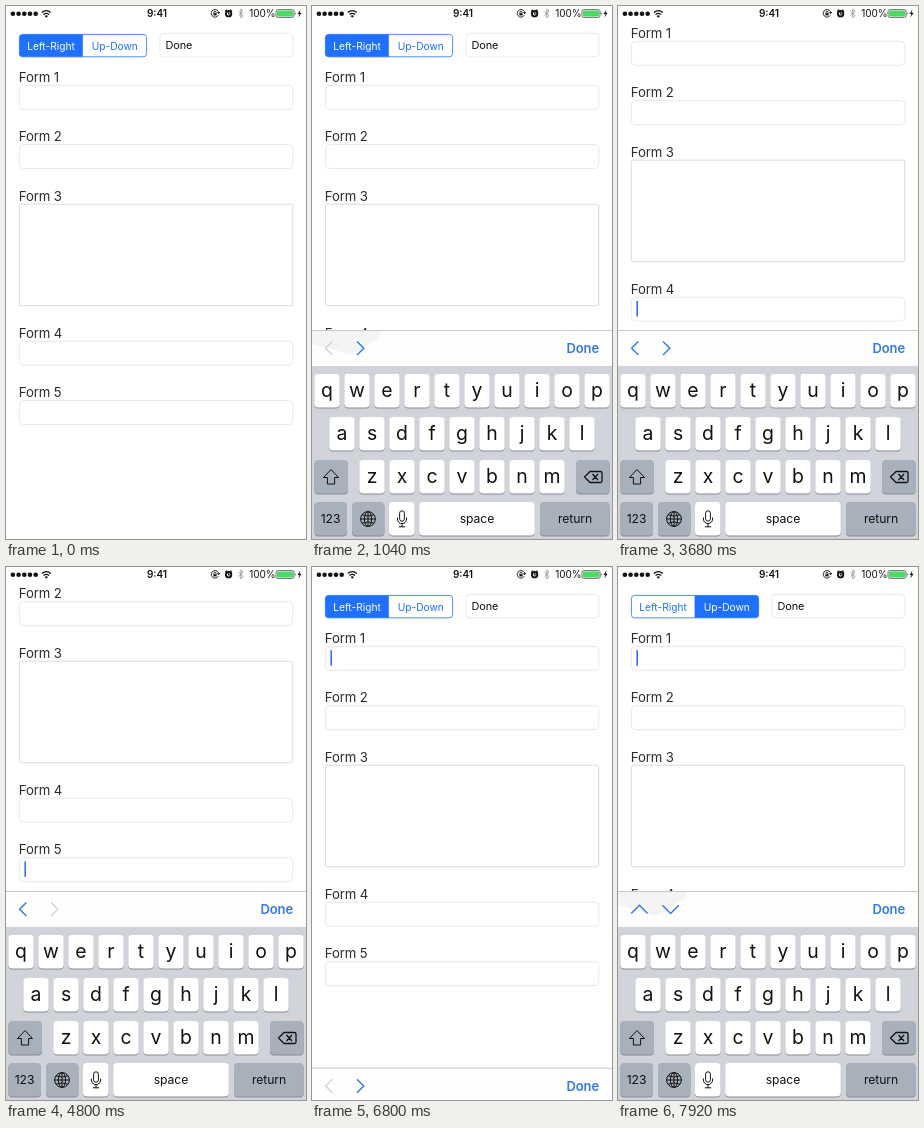
An HTML page that plays this animation: 300x533 px, repeating every 8000 ms.

```html
<!DOCTYPE html>
<html lang="en">
<head>
<meta charset="utf-8">
<title>Form navigation</title>
<style>
  html, body { margin: 0; width: 100%; height: 100%; overflow: hidden; background: #fff; }
  svg { display: block; width: 100vw; height: 100vh; font-family: Inter, Roboto, sans-serif; fill: #111; }
  .label { font-size: 13.2px; letter-spacing: -.15px; fill: #2c2c2c; }
  .field { fill: #fff; stroke: #e3e3e3; stroke-width: .8; }
  .segment { font-size: 10.2px; text-anchor: middle; }
  .small { font-size: 10.9px; letter-spacing: -.1px; }
  .status { font-size: 10px; }
  .done { font-size: 13px; font-weight: 600; letter-spacing: -.1px; text-anchor: end; fill: #3478e5; }
  .arrow { fill: none; stroke-width: 1.4; }
  .lower { font-size: 19.4px; text-anchor: middle; }
  .upper { font-size: 17.5px; text-anchor: middle; }
  .word { font-size: 12.2px; letter-spacing: -.1px; text-anchor: middle; }
  .line { fill: none; stroke: #111; stroke-linejoin: round; }
</style>
</head>
<body>
<svg viewBox="0 0 300 533" preserveAspectRatio="none">
  <rect width="300" height="533" fill="#fff"/>
  <g id="content">
    <rect x="13.4" y="28.4" width="127.2" height="22.4" rx="3.2" fill="#fff"/>
    <path id="selected" fill="#1f70ff"/>
    <rect x="13.4" y="28.4" width="127.2" height="22.4" rx="3.2" fill="none" stroke="#1f70ff" stroke-width=".8"/>
    <text id="leftRight" class="segment" x="45" y="43.5">Left-Right</text>
    <text id="upDown" class="segment" x="108.8" y="43.5">Up-Down</text>
    <rect class="field" x="153.9" y="27.4" width="133" height="23.6" rx="4"/>
    <text class="small" x="159.6" y="43.3">Done</text>
    <g id="forms"></g>
    <rect id="caret" width="1.6" height="15.5" fill="#3472e4"/>
  </g>

  <rect width="300" height="16" fill="#fff"/>
  <g class="status">
    <g id="signal"></g>
    <path d="M35.8 6.6Q40.3 2.8 44.8 6.6M37.5 8.5Q40.3 6.2 43.1 8.5" fill="none" stroke="#111" stroke-width="1.3"/>
    <path d="M38.6 10Q40.3 8.6 42 10L40.3 11.8Z"/>
    <text x="151" y="11" text-anchor="middle" font-weight="600">9:41</text>
    <g class="line" stroke-width=".9">
      <path d="M212.3 9.2A3.8 3.8 0 1 1 212.8 7.2M211.2 6.6L212.8 7.6 213.8 6"/>
      <path d="M207.9 7.2V6.3A1.1 1.1 0 0 1 210.1 6.3V7.2"/>
      <rect x="207.4" y="7.2" width="3.2" height="2.2" fill="#111" stroke="none"/>
      <circle cx="222.6" cy="7.7" r="2.7" stroke-width="1.9"/>
      <path d="M222.6 6.2V8H224M219.2 5.3L221 3.7M226 5.3L224.2 3.7" stroke-width="1.1"/>
      <path d="M232.5 5.2L237 9.6 234.8 11.8V3L237 5.2 232.5 9.6" stroke="#888" stroke-width=".8"/>
    </g>
    <text x="243.3" y="11" letter-spacing="-.1">100%</text>
    <rect x="270" y="3.6" width="18" height="7.8" rx="1.6" fill="#fff" stroke="#333" stroke-width=".7"/>
    <rect x="271" y="4.6" width="16" height="5.8" rx=".8" fill="#4cd964"/>
    <path d="M288.9 6V9Q290.3 7.5 288.9 6Z"/>
    <path d="M294.4 3.5L291.5 8H293.4L292.4 11.5 295.6 6.8H293.6Z"/>
  </g>

  <g id="keyboard">
    <rect y="324" width="300" height="37" fill="#fefefe"/>
    <path id="shade" d="M0 325H68L66 334 56 337 48 345 36 349 26 345 8 340 0 338Z" fill="#f4f4f4"/>
    <rect y="324" width="300" height=".8" fill="#bcbcbc"/>
    <path id="previous" class="arrow"/>
    <path id="next" class="arrow"/>
    <text class="done" x="287" y="347.3">Done</text>
    <rect y="360" width="300" height="174" fill="#d0d4da"/>
    <g id="keys"></g>
    <g id="lowerKeys"></g>
    <g id="upperKeys"></g>
    <path id="shift" class="line" d="M19 463.5L26.5 471.5H22.6V478H15.4V471.5H11.5Z"/>
    <path class="line" stroke-width="1.3" d="M272.5 471L278 465.5H288.5Q290 465.5 290 467V475Q290 476.5 288.5 476.5H278ZM280.5 468L286 474M286 468L280.5 474"/>
    <g class="line">
      <circle cx="56" cy="513" r="7.4"/>
      <ellipse cx="56" cy="513" rx="3.6" ry="7.4"/>
      <path d="M48.6 513H63.4M56 505.6V520.4M50 508.8Q56 511.4 62 508.8M50 517.2Q56 514.6 62 517.2"/>
      <rect x="87.6" y="504.8" width="4.8" height="10.4" rx="2.4"/>
      <path d="M85.4 511.5V513A4.6 4.6 0 0 0 94.6 513V511.5M90 517.6V520.8M86.8 520.8H93.2"/>
    </g>
  </g>
</svg>
<script>
const LOOP = 8000, BLUE = '#3478e5', GRAY = '#d0d3d8', KEY_GRAY = '#a8b0bc';
const RISES = [280, 6762], FALL = 5532, SLIDE = 500, SCROLL = 300, SWITCH = 7680;
const $ = id => document.getElementById(id);
const set = (id, attributes) => {
  for (const name in attributes) $(id).setAttribute(name, attributes[name]);
};

const fields = [[79.4, 24], [138.6, 24], [198.2, 101.5], [335.2, 24], [394.6, 24]];
$('forms').innerHTML = fields.map(([y, height], i) =>
  `<text class="label" x="12.8" y="${y - 3.7}">Form ${i + 1}</text>
   <rect class="field" x="13.4" y="${y}" width="273.4" height="${height}" rx="${i === 2 ? 2 : 4}"
     ${i === 2 ? 'style="stroke:#d2d2d2"' : ''}/>`).join('');

$('signal').innerHTML = [0, 1, 2, 3, 4].map(i =>
  `<circle cx="${6.9 + i * 5.7}" cy="7.8" r="2.3"/>`).join('');

// Keyboard: caps are shared, letters come in two cases.
const keyCap = (x, y, width, fill = '#fff', id = '') =>
  `<rect x="${x}" y="${y + 1}" width="${width}" height="33.4" rx="4" fill="#898c92"/>
   <rect ${id && `id="${id}"`} x="${x}" y="${y}" width="${width}" height="33.4" rx="4" fill="${fill}"/>`;
const word = (x, text) => `<text class="word" x="${x}" y="517.3">${text}</text>`;
const letters = [['qwertyuiop', 15, 368], ['asdfghjkl', 30, 411], ['zxcvbnm', 60, 454]]
  .flatMap(([row, x, y]) => [...row].map((letter, i) => ({ letter, x: x + 30 * i, y })));
$('keys').innerHTML = letters.map(k => keyCap(k.x - 12.7, k.y, 25.4)).join('')
  + keyCap(2.4, 454, 33.6, KEY_GRAY, 'shiftCap') + keyCap(264, 454, 33.6, KEY_GRAY)
  + keyCap(2.4, 496, 32.6, KEY_GRAY) + keyCap(40, 496, 32.4, KEY_GRAY)
  + keyCap(77, 496, 25.6) + keyCap(107.2, 496, 115.6) + keyCap(228, 496, 69.6, KEY_GRAY)
  + word(18.5, '123') + word(165, 'space') + word(263, 'return');
$('lowerKeys').innerHTML = letters.map(k =>
  `<text class="lower" x="${k.x}" y="${k.y + 22.8}">${k.letter}</text>`).join('');
$('upperKeys').innerHTML = letters.map(k =>
  `<text class="upper" x="${k.x}" y="${k.y + 23.7}">${k.letter.toUpperCase()}</text>`).join('');

const clamp = v => Math.min(1, Math.max(0, v));
const smooth = v => { v = clamp(v); return v * v * (3 - 2 * v); };
const bezier = (s, a, b) => 3 * (1 - s) ** 2 * s * a + 3 * (1 - s) * s * s * b + s ** 3;

// Fast start, long settle: cubic-bezier(.38, .7, .125, 1)
function slide(v) {
  if (v <= 0 || v >= 1) return clamp(v);
  let low = 0, high = 1;
  for (let i = 0; i < 20; i++) {
    const mid = (low + high) / 2;
    if (bezier(mid, .38, .125) < v) low = mid; else high = mid;
  }
  return bezier(low, .7, 1);
}

// [time, focused field]; -1 means none
const focusChanges = [
  [0, -1], [RISES[0], 0], [1360, 1], [2240, 2], [3080, 3], [4440, 4], [FALL, -1], [RISES[1], 0]
];

function caretAlpha(age) {
  const phase = age % 1150;
  return phase < 600 ? 1 : phase < 1050 ? 1 - smooth((phase - 600) / 130) : smooth((phase - 1050) / 100);
}

const arrows = {
  horizontal: ['M20.4 335.4L13.6 342.2 20.4 349', 'M45 335.4L51.8 342.2 45 349'],
  vertical: ['M13.2 346.4L21.4 338.2 29.6 346.4', 'M44.4 338.2L52.6 346.4 60.8 338.2']
};

function draw(t) {
  const [since, focus] = focusChanges.findLast(([time]) => time <= t);
  const up = slide((t - RISES[0]) / SLIDE) - slide((t - FALL) / SLIDE) + slide((t - RISES[1]) / SLIDE);
  const scroll = (44 * smooth((t - 3080) / SCROLL) + 60 * smooth((t - 4440) / SCROLL))
    * (1 - slide((t - FALL) / SLIDE));
  const vertical = t >= SWITCH;
  const capitals = focus === 2;

  set('content', { transform: `translate(0 ${-scroll})` });
  set('keyboard', { transform: `translate(0 ${209.5 * (1 - up)})` });
  set('shade', { opacity: up > .97 ? 1 - clamp(scroll / 40) : 0 });

  set('selected', { d: vertical
    ? 'M76.6 28.4H137.4Q140.6 28.4 140.6 31.6V47.6Q140.6 50.8 137.4 50.8H76.6Z'
    : 'M76.8 28.4H16.6Q13.4 28.4 13.4 31.6V47.6Q13.4 50.8 16.6 50.8H76.8Z' });
  set('leftRight', { fill: vertical ? '#1f70ff' : '#fff' });
  set('upDown', { fill: vertical ? '#fff' : '#1f70ff' });

  const [previous, next] = arrows[vertical ? 'vertical' : 'horizontal'];
  const first = t < 1360 || t >= RISES[1];
  const last = t >= 4440 && t < RISES[1];
  set('previous', { d: previous, stroke: first && !vertical ? GRAY : BLUE });
  set('next', { d: next, stroke: last ? GRAY : BLUE });

  set('lowerKeys', { visibility: capitals ? 'hidden' : 'visible' });
  set('upperKeys', { visibility: capitals ? 'visible' : 'hidden' });
  set('shiftCap', { fill: capitals ? '#fff' : KEY_GRAY });
  $('shift').style.fill = capitals ? '#000' : 'none';

  if (focus < 0) set('caret', { opacity: 0 });
  else set('caret', {
    x: capitals ? 16.2 : 18.4,
    y: fields[focus][0] + (capitals ? 5 : 3.8),
    opacity: caretAlpha(t - since)
  });
}

const start = performance.now();
function tick() {
  draw((performance.now() - start) % LOOP);
  requestAnimationFrame(tick);
}
tick();
</script>
</body>
</html>
```
